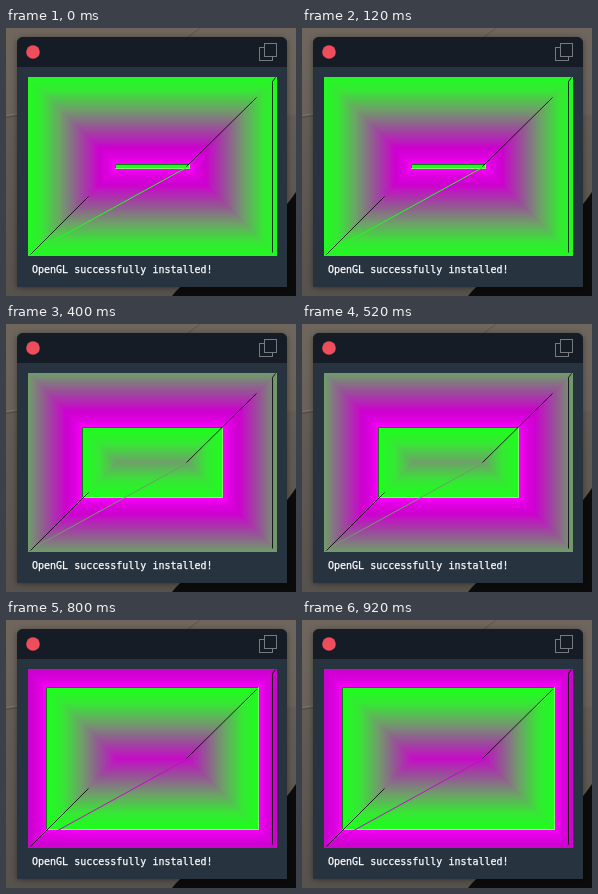
An HTML page with a canvas for the animation above (1000 ms loop, 290 by 268 pixels).

```html
<!DOCTYPE html>
<html lang="en">
<head>
<meta charset="utf-8">
<style>
html, body { margin: 0; width: 100%; height: 100%; overflow: hidden; }
body { position: relative; background: #655e57; }
canvas { position: absolute; left: 0; top: 0; }
p {
  position: absolute; left: 26px; top: 236px; margin: 0;
  font: 10px/12px "DejaVu Sans Mono", monospace;
  color: #fff; white-space: pre; -webkit-text-stroke: .25px #fff;
}
</style>
</head>
<body>
<canvas width="290" height="268"></canvas>
<p>OpenGL successfully installed!</p>
<script>
const ctx = document.querySelector('canvas').getContext('2d');
const LOOP = 1000, STEP = 200, PERIOD = 90;
const VIEW = { x: 22, y: 49, w: 249, h: 179 };

// inset of the green edge at each step
const insets = [87, 73, 54, 36, 18];

// position, red, green, blue
const ramp = [
  [0, 28, 255, 28],
  [.18, 54, 231, 52],
  [.39, 110, 160, 105],
  [.59, 150, 84, 150],
  [.82, 205, 0, 207],
  [.92, 222, 0, 224],
  [1, 252, 0, 252]
];

function colour(depth, inset) {
  const t = ((depth - inset + PERIOD) % PERIOD) / PERIOD;
  const i = Math.max(1, ramp.findIndex(s => s[0] >= t));
  const a = ramp[i - 1], b = ramp[i];
  const k = (t - a[0]) / (b[0] - a[0]);
  const rgb = [1, 2, 3].map(c => Math.round(a[c] + (b[c] - a[c]) * k));
  return `rgb(${rgb})`;
}

function box(x, y, w, h, fill) {
  ctx.fillStyle = fill;
  ctx.fillRect(x, y, w, h);
}

function line(stroke, ...pts) {
  ctx.strokeStyle = stroke;
  ctx.lineWidth = 1;
  ctx.beginPath();
  pts.forEach(([x, y]) => ctx.lineTo(x + .5, y + .5));
  ctx.stroke();
}

function drawBackdrop() {
  const g = ctx.createLinearGradient(0, 0, 0, 268);
  g.addColorStop(0, '#6f675d');
  g.addColorStop(.32, '#69625a');
  g.addColorStop(.33, '#625c55');
  g.addColorStop(1, '#57524d');
  box(0, 0, 290, 268, g);
  line('#7d756b', [0, 87], [11, 85]);
  line('#514b46', [0, 89], [11, 87]);
  line('#57514b', [181, 9], [193, 0]);
  ctx.fillStyle = '#0c0b0b';
  ctx.beginPath();
  ctx.moveTo(166, 268);
  ctx.quadraticCurveTo(180, 250, 215, 232);
  ctx.quadraticCurveTo(262, 205, 290, 164);
  ctx.lineTo(290, 268);
  ctx.fill();
}

function drawWindow() {
  ctx.save();
  ctx.shadowColor = 'rgba(0,0,0,.4)';
  ctx.shadowBlur = 6;
  ctx.shadowOffsetY = 1;
  ctx.fillStyle = '#283340';
  ctx.beginPath();
  ctx.roundRect(11, 9, 270, 250, [6, 6, 1, 1]);
  ctx.fill();
  ctx.restore();
  ctx.fillStyle = '#151c25';
  ctx.beginPath();
  ctx.roundRect(11, 9, 270, 30, [6, 6, 0, 0]);
  ctx.fill();
  ctx.fillStyle = '#f04d5c';
  ctx.beginPath();
  ctx.arc(27, 24, 6.8, 0, 7);
  ctx.fill();
  ctx.strokeStyle = '#777b80';
  ctx.strokeRect(253.5, 19.5, 13, 13);
  box(258, 15, 13, 14, '#151c25');
  ctx.strokeRect(258.5, 15.5, 12, 13);
}

function drawRim(inset) {
  const l = VIEW.x + inset, t = VIEW.y + inset;
  const r = VIEW.x + VIEW.w - inset - 1, b = VIEW.y + VIEW.h - inset - 1;
  line('rgba(0,60,0,.65)', [l, b], [l, t], [r, t]);
  line('rgba(170,255,140,.7)', [r, t], [r, b], [l, b]);
}

function drawTunnel(inset) {
  const { x, y, w, h } = VIEW;
  for (let d = 0; d < PERIOD; d++) {
    box(x + d, y + d, w - 2 * d, h - 2 * d, colour(d, inset));
  }
  drawRim(inset);
  line(colour(0, inset), [24, 225], [180, 139]);
  const ink = 'rgba(0,0,0,.8)';
  line(ink, [24, 226], [82, 168]);
  line(ink, [180, 138], [250, 69]);
  line(ink, [269, 49], [266, 53], [266, 224]);
}

let shown = -1;
function frame() {
  const i = Math.floor(performance.now() % LOOP / STEP);
  if (i !== shown) {
    shown = i;
    drawTunnel(insets[i]);
  }
  requestAnimationFrame(frame);
}

drawBackdrop();
drawWindow();
frame();
</script>
</body>
</html>
```
